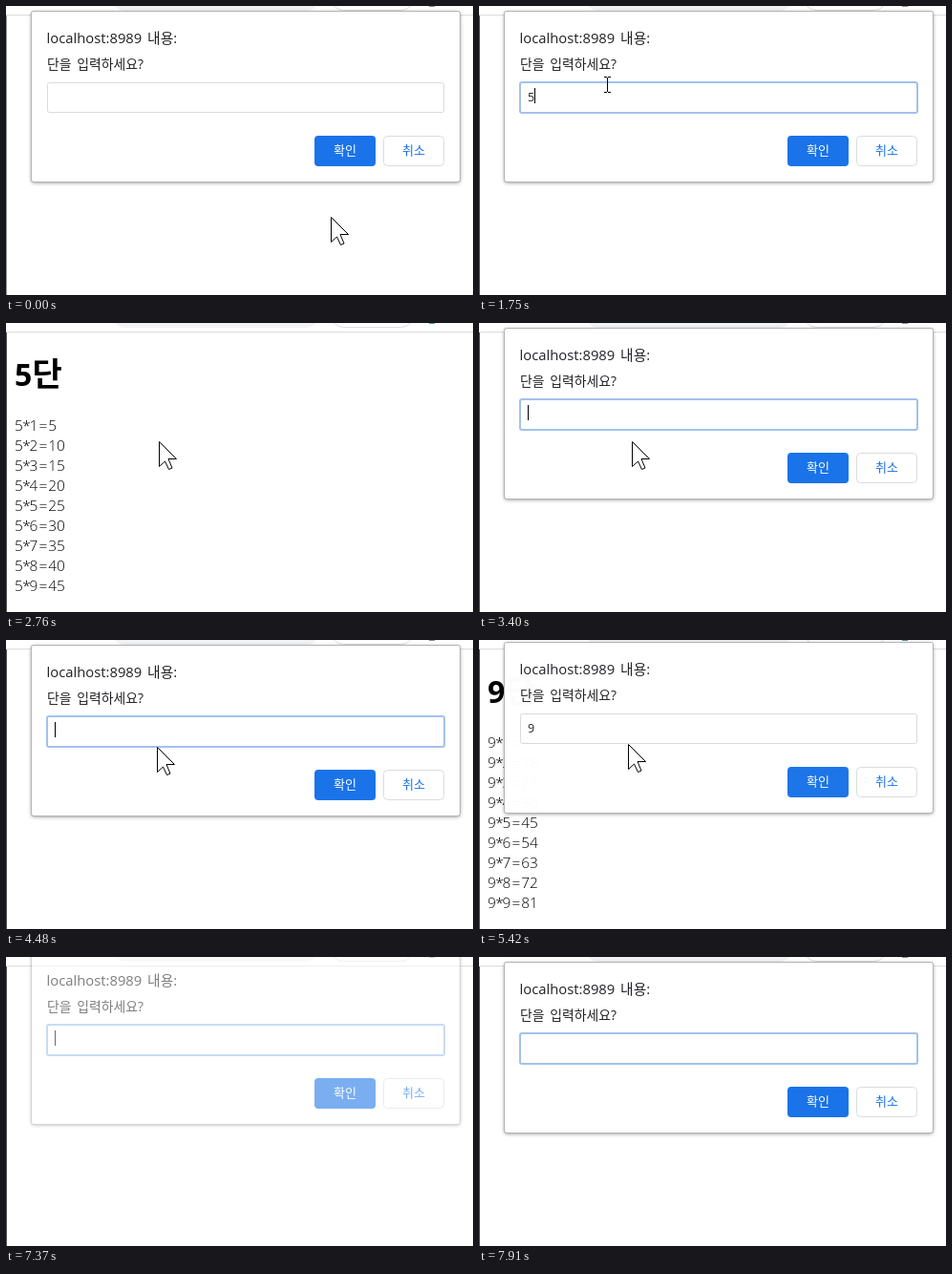
An HTML page with a canvas that plays this animation: 489 by 303 pixels, repeating every 8000 ms.

```html
<!DOCTYPE html>
<html lang="ko">
<head>
<meta charset="utf-8">
<style>
  html, body { margin: 0; width: 100%; height: 100%; overflow: hidden; background: #fff; }
  canvas { display: block; }
</style>
</head>
<body>
<canvas width="489" height="303"></canvas>
<script>
const stage = document.querySelector('canvas').getContext('2d');
const layer = stage.canvas.cloneNode().getContext('2d');
let ctx = stage;

const LOOP = 8000, STEP = 76.5, BLINK = 535;
const FONT = '"Open Sans", "Noto Sans CJK KR", sans-serif';

const prompts = [
  { open: -1000, focus: 610, typed: 1450, close: 1830, value: 5 },
  { open: 3160, focus: 3160, typed: 4640, close: 5420, value: 9 },
  { open: 7370, focus: 7370, typed: Infinity, close: Infinity, value: 0 },
];

// Pointer moves: start time, number of steps, end x, end y
const moves = [
  [70, 8, 147, 99], [1370, 3, 134, 82], [1830, 4, 141, 89], [2370, 3, 158, 127],
  [2680, 2, 160, 124], [3470, 2, 160, 116], [3710, 1, 160, 115], [3860, 1, 159, 114],
  [4020, 1, 159, 113], [4480, 1, 158, 112], [4640, 2, 158, 111], [5260, 1, 156, 109],
  [5490, 6, 163, 163], [6040, 1, 167, 191],
];

// Stepped progress: 1/n at the start time, 1 after n steps
function progress(t, start, n) {
  if (t < start) return 0;
  return Math.min(1, (Math.floor((t - start + 8) / STEP) + 1) / n);
}

function text(str, x, y, size, color = '#202124', weight = 400) {
  ctx.font = `${weight} ${size}px ${FONT}`;
  ctx.fillStyle = color;
  ctx.fillText(str, x, y);
}

function box(x, y, w, h, r, fill, stroke, line = 1) {
  ctx.beginPath();
  ctx.roundRect(x, y, w, h, r);
  if (fill) { ctx.fillStyle = fill; ctx.fill(); }
  if (stroke) { ctx.strokeStyle = stroke; ctx.lineWidth = line; ctx.stroke(); }
}

function rect(x, y, w, h, color) {
  ctx.fillStyle = color;
  ctx.fillRect(x, y, w, h);
}

function drawBrowser(t, modal) {
  rect(0, 0, 489, 303, '#fff');
  box(111, -24, 217, 29, 14, '#f1f3f4');
  box(339.5, -24.5, 88, 29, 14, '#fff', '#dadce0');
  rect(443, 0, 6, 1, modal ? '#a08c8c' : '#5f9ea0');
  rect(0, 9, 489, 1, '#dcdcdc');
  rect(0, 10, 1, 293, t < 680 ? '#999' : '#555');
}

function drawTable(n) {
  text(n, 9, 66, 32, '#000', 700);
  text('단', 27.5, 66, 34, '#000', 700);
  for (let i = 1; i <= 9; i++) {
    const cell = (str, x) => text(str, x, 91.5 + i * 21, 15.4, '#000', 350);
    cell(n, 9);
    cell('*', 17.3);
    cell(i, 24.4);
    cell('=', 34.4);
    cell(n * i, 44.2);
  }
}

function drawDialog(t, p) {
  const closing = t >= p.close;
  const away = closing ? progress(t, p.close, 4) : 1 - progress(t, p.open, 4);
  if (away >= 1) return;
  const focused = t >= p.focus && !closing;
  const typed = t >= p.typed;

  // Compose on its own layer so that the whole dialog fades as one
  ctx = layer;
  ctx.clearRect(0, 0, 489, 303);
  ctx.shadowColor = 'rgba(0,0,0,.5)';
  ctx.shadowBlur = 4;
  ctx.shadowOffsetY = 1;
  box(27, 6, 448, 178, 2, '#fff');
  ctx.shadowColor = 'transparent';
  box(26.5, 5.5, 449, 179, 2, null, '#b4b4b4');

  ctx.textAlign = 'left';
  ctx.wordSpacing = '2px';
  text('localhost:8989 내용:', 42.5, 38.5, 14.8);
  text('단을 입력하세요?', 43, 66, 13.9);

  if (focused) box(43, 80, 416, 32, 2, '#fff', '#a3c1ec', 2);
  else box(43.5, 80.5, 415, 31, 2, '#fff', '#d8dade');
  if (typed) text(p.value, 51, 100, 12.5);
  const since = typed ? p.typed : p.focus;
  if (focused && Math.floor((t - since) / BLINK) % 2 === 0) {
    rect(typed ? 58 : 51, 86, 1, 16, '#000');
  }

  box(323, 136, 64, 32, 4, '#1a73e8');
  box(395.5, 136.5, 63, 31, 4, '#fff', '#dadce0');
  ctx.textAlign = 'center';
  text('확인', 355, 156, 13, '#fff', 500);
  text('취소', 427, 156, 13, '#1a73e8');

  ctx = stage;
  ctx.globalAlpha = 1 - away ** 3;
  ctx.drawImage(layer.canvas, 0, -12 * away);
  ctx.globalAlpha = 1;
}

function drawPointer(t) {
  if (t >= 6120) return;
  let x = 340, y = 221;
  for (const [start, n, endX, endY] of moves) {
    const k = progress(t, start, n);
    x += (endX - x) * k;
    y += (endY - y) * k;
  }
  x = Math.round(x);
  y = Math.round(y);

  if (t < 1900 && y < 112) {
    rect(x, y - 7, 1, 15, '#000');
    for (const dy of [-8, 8]) {
      rect(x - 3, y + dy, 3, 1, '#000');
      rect(x + 1, y + dy, 3, 1, '#000');
    }
    return;
  }
  ctx.save();
  ctx.translate(x + .5, y + .5);
  const arrow = new Path2D('M0 0V26L6 20.5L10 29L13.5 27.5L9.5 18H18Z');
  ctx.fillStyle = '#fff';
  ctx.fill(arrow);
  ctx.strokeStyle = '#000';
  ctx.lineWidth = 1;
  ctx.stroke(arrow);
  ctx.restore();
}

function frame(now) {
  const t = now % LOOP;
  const prompt = prompts.findLast(p => t >= p.open);
  const answered = t >= prompt.close;
  drawBrowser(t, !answered);
  if (answered) drawTable(prompt.value);
  drawDialog(t, prompt);
  drawPointer(t);
  requestAnimationFrame(frame);
}
requestAnimationFrame(frame);
</script>
</body>
</html>
```
